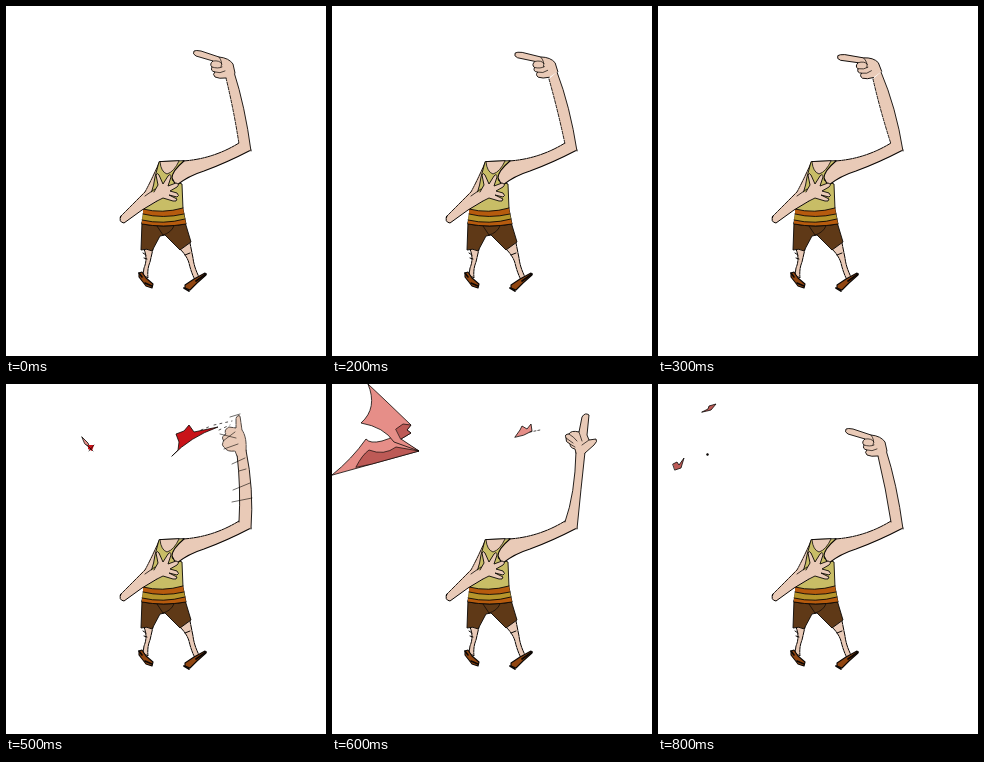
Recreate the animation shown at these times as an HTML page with a canvas. Size 320 by 350 pixels, loop 0.9 s.

```html
<!DOCTYPE html>
<html lang="en">
<head>
<meta charset="utf-8">
<title>Snap point</title>
<style>
html, body { margin: 0; width: 100%; height: 100%; overflow: hidden; background: #fff; }
canvas { display: block; }
</style>
</head>
<body>
<canvas id="stage" width="320" height="350"></canvas>
<script>
const ctx = document.getElementById('stage').getContext('2d');
const STEP = 100, COUNT = 9;
const INK = '#0b0705', SKIN = '#e9cab7', SHIRT = '#c8bd66', RUST = '#b65b0e',
      GOLD = '#b6952b', SHORTS = '#5f3917', SHOE = '#914611',
      RED = '#c91319', PINK = '#e68e88', ROSE = '#bd5a56';

function fill(d, color) {
  ctx.fillStyle = color;
  ctx.fill(new Path2D(d));
}
function line(d, width = 1, dash = []) {
  ctx.strokeStyle = INK;
  ctx.lineWidth = width;
  ctx.setLineDash(dash);
  ctx.stroke(new Path2D(d));
}
function shape(d, color, width = 1) {
  fill(d, color);
  line(d, width);
}
// Draws a part moved by x, y and turned and scaled about its pivot.
function place(draw, x, y, px, py, angle = 0, scale = 1) {
  ctx.save();
  ctx.translate(x + px, y + py);
  ctx.rotate(angle);
  ctx.scale(scale, scale);
  ctx.translate(-px, -py);
  draw();
  ctx.restore();
}

function legs() {
  const left = 'M138 243Q142 253 138 262L137 269L142 272Q141 263 144 256L147 243';
  fill(left, SKIN);
  line(left, 1, [5, 1]);
  line('M137 247L140 249M138 252L141 253');
  const right = 'M174 243Q181 250 183 257Q185 266 189 274L193 271Q188 261 187 252L184 237';
  fill(right, SKIN);
  line(right, 1, [5, 1]);
  line('M179 249L184 247');
  shape('M133 267L136 266L140 272L147 278L146 282L140 280L133 271Z', SHOE, 1.1);
  line('M133 267L136 271M139 277L146 280', 1.6);
  shape('M179 279L188 273L199 267L200 269L191 277L184 284L179 282Z', SHOE, 1.1);
  line('M190 275L200 268M178 282L183 285', 1.8);
  shape('M136 216L135 244Q141 242 146 245L154 230L159 229L174 244L185 236L179 216Z', SHORTS, .9);
  line('M157 229L151 220M157 229Q165 227 168 220', .7);
}

function torso() {
  fill('M153 156L140 184L114 211Q113 216 118 217L141 200L156 168Z', SKIN);
  line('M153 157Q146 173 139 186L114 211', .9, [4, 1]);
  shape('M153 156L149 171Q147 187 138 203L136 218Q158 222 180 218L177 203L176 178L166 174L178 155Z', SHIRT, .9);
  fill('M137 203Q156 208 177 202L178 208Q157 213 137 208Z', RUST);
  fill('M137 208Q157 213 178 208L179 214Q157 219 136 214Z', GOLD);
  fill('M136 214Q157 219 179 213L180 218Q157 222 136 218Z', RUST);
  line('M137 203Q156 208 177 202M137 208Q157 213 178 208M136 214Q157 219 179 213M136 218Q157 222 180 218', .9);
  shape('M154 156Q155 166 161 168Q168 166 173 155Z', SKIN, .8);
}

function upperArm() {
  fill('M178 155Q207 153 233 137L245 144Q215 160 192 167Q177 174 170 179Q164 172 168 165Z', SKIN);
  line('M178 155Q166 165 166 172Q168 177 171 179Q182 170 198 165Q220 157 245 144', 1.1);
  line('M177 155Q207 153 233 137', 1, [6, 1, 3, 1]);
}

function chestArm() {
  fill('M115 211L139 188L150 185L152 195L134 205L118 217Q113 216 115 211Z', SKIN);
  line('M115 210Q112 216 118 217L136 204L151 195');
  line('M139 190L149 183', .8);
  const hand = 'M148 186L152 179L150 169Q151 166 153 169L157 178L162 170Q165 167 165 171' +
    'L162 180L170 177Q174 178 171 181L164 185L171 187Q174 190 171 191L163 189' +
    'L171 193Q171 196 167 195L157 192L151 195';
  fill(hand, SKIN);
  line(hand, .9);
}

// Wrist left, left bend, right bend, wrist right.
function forearm([ax, ay, bx, by, cx, cy, dx, dy], dash = []) {
  const left = `M${ax} ${ay}Q${bx} ${by} 233 138`;
  fill(`${left}L245 145Q${cx} ${cy} ${dx} ${dy}Z`, SKIN);
  line(left, .9, dash);
  line(`M245 145Q${cx} ${cy} ${dx} ${dy}`, .9);
}

function pointing() {
  const hand = 'M220 72Q213 73 209 71Q206 68 209 66Q204 65 206 61Q203 58 207 55' +
    'L190 50Q186 48 188 45Q190 44 195 45L213 51Q223 52 227 58L229 67';
  fill(hand, SKIN);
  line(hand, .9);
  line('M207 55Q214 54 216 58M206 61Q212 63 216 61M209 66Q214 68 219 65M213 51Q217 56 215 61', .7);
}

function raised() {
  const hand = 'M244 69L243 65Q238 64 238 60Q233 58 234 54Q232 50 237 50Q239 46 247 48' +
    'L250 33Q253 28 257 31L255 51L257 56L264 55Q266 57 262 61L253 69';
  fill(hand, SKIN);
  line(hand, .9);
  line('M237 50Q242 53 245 57M234 54L241 59M238 60L243 63M247 48L250 57M257 56L250 61', .7);
}

function whipping() {
  const hand = 'M231 72L229 67Q221 68 219 64Q214 61 218 57Q214 53 220 50Q217 46 223 43' +
    'L230 44L230 34Q232 30 234 32L236 46Q241 53 240 67';
  fill(hand, SKIN);
  line(hand, .7, [5, 1]);
  line('M224 33L234 30M214 50L230 54M218 65L232 60M217 57L229 48M226 80L239 74' +
    'M227 106L244 99M226 118L246 114M233 87L240 85', .6);
}

function pointPose(x, y, angle, arm, dash) {
  forearm(arm, dash);
  place(pointing, x, y, 224, 69, angle);
}

function spark() {
  shape('M170 53L176 53L177 48L179 53L183 54L179 56L178 60L175 56Z', RED, .8);
}

function burst() {
  shape('M166 72L172 66L173 58L170 50L178 47L183 41L188 48L212 43Q184 53 166 72Z', RED, .8);
  line('M195 46L205 42M208 41L226 37M213 46L224 41', .7, [2, 4]);
  shape('M76 53L82 59L84 64L79 60Z', PINK, .8);
  fill('M82 61L88 61L86 67L82 65Z', RED);
  line('M81 61L87 67M88 61L83 67', .7);
}

function bigShards() {
  shape('M0 91Q20 75 34 55Q38 60 50 57Q57 55 62 52L87 67L40 80Z', PINK, .8);
  shape('M24 83Q30 71 37 66Q52 72 64 63L87 67L40 80Z', ROSE, .7);
  shape('M36 0L54 17L79 41L75 46L79 49L69 55L87 67L62 58Q52 43 29 39Q46 24 36 0Z', PINK, .8);
  shape('M64 45L71 40L79 41L75 46L79 49L69 55Z', ROSE, .7);
  shape('M183 53L188 46L190 42L195 45L199 40L200 47L192 51Z', PINK, .8);
  line('M198 48L208 46', .7, [2, 2]);
}

function chip() {
  shape('M44 28L50 25L51 22L58 20L53 26L49 27Z', ROSE, .8);
}
function hook() {
  shape('M15 80L19 78L21 81L26 74L23 84L17 86Z', ROSE, .8);
}
function smallShards() {
  chip();
  hook();
  fill('M48 70L50 69L51 71L49 72Z', INK);
}
function midShards() {
  place(chip, 0, 0, 50, 22, 0, 2);
  place(hook, 2, 0, 20, 80, 0, 2);
  fill('M58 66L63 64L61 69Z', ROSE);
}

const REST = [220, 72, 228, 105, 239, 100, 228, 66];
const DOTS = [3, 1.5];
const poses = [
  () => pointPose(0, 0, 0, REST, DOTS),
  () => pointPose(-1, 0, -.04, [219, 73, 227, 105, 238, 100, 227, 66], DOTS),
  () => pointPose(-3, -1, -.08, [217, 73, 226, 105, 238, 100, 225, 66], DOTS),
  () => pointPose(-5, -1, -.15, [215, 73, 222, 104, 238, 101, 223, 66], DOTS),
  () => {
    pointPose(-9, 0, -.22, [211, 73, 217, 107, 236, 103, 219, 65], DOTS);
    place(spark, 0, 0, 177, 54, 0, .75);
  },
  () => {
    forearm([231, 70, 235, 104, 248, 105, 240, 66]);
    whipping();
    burst();
  },
  () => {
    forearm([244, 68, 243, 110, 249, 104, 253, 68]);
    raised();
    bigShards();
  },
  () => {
    pointPose(11, -2, .5, [231, 70, 236, 105, 245, 103, 240, 67]);
    midShards();
  },
  () => {
    pointPose(0, 0, 0, REST);
    smallShards();
  }
];

function draw(now) {
  const step = Math.floor(now / STEP) % COUNT;
  ctx.fillStyle = '#fff';
  ctx.fillRect(0, 0, 320, 350);
  legs();
  torso();
  upperArm();
  chestArm();
  poses[step]();
}

ctx.lineJoin = ctx.lineCap = 'round';
const start = performance.now();
function loop() {
  draw(performance.now() - start);
  requestAnimationFrame(loop);
}
loop();
</script>
</body>
</html>
```
